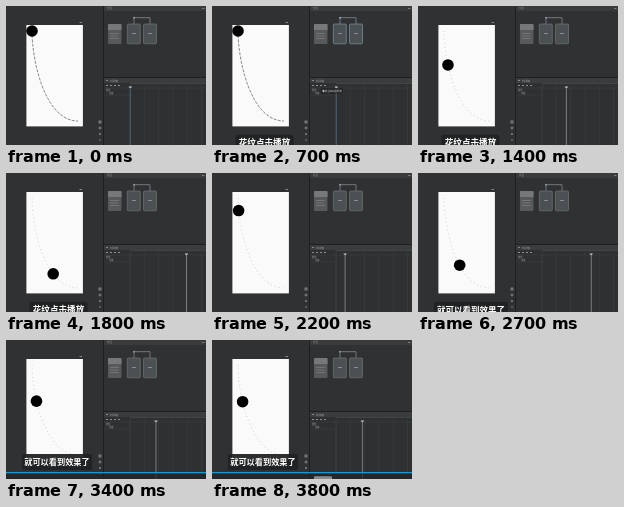
These frames come from a looping animation (200 px wide and 139 px high, 3900 ms). An HTML page:

```html
<!DOCTYPE html>
<html>
<head>
<meta charset="utf-8">
<title>Motion path editor</title>
<style>
  html, body { margin: 0; width: 100%; height: 100%; overflow: hidden; background: #303133; }
  svg { display: block; width: 100vw; height: 100vh; }
  text { font-family: "Noto Sans CJK SC", "Noto Sans CJK", "Noto Sans", sans-serif; font-size: 2.6px; fill: #a2a4a6; }
  #captionText { font-weight: 700; fill: #fff; text-anchor: middle; }
</style>
</head>
<body>
<svg viewBox="0 0 200 139" preserveAspectRatio="none">
  <rect width="200" height="139" fill="#303133"/>

  <!-- Artboard -->
  <rect x="20.4" y="19" width="56.5" height="101.4" fill="#fafafa"/>
  <rect x="73.5" y="16" width="2.5" height="1" fill="#85878a"/>
  <path id="track" d="M26 25C26 55 39 115 72 115" fill="none" stroke-width=".65"/>
  <circle id="ball" r="5.8" fill="#000"/>

  <!-- Tool strip -->
  <g fill="none" stroke="#a0a2a4" stroke-width=".7">
    <rect x="93" y="115" width="2" height="2"/>
    <circle cx="94" cy="122" r="1"/>
    <path d="M93 128h2m-1-1v2M93 134h2"/>
  </g>

  <!-- Interaction panel -->
  <rect x="98" width="102" height="71" fill="#2f3133"/>
  <rect x="98" width="102" height="5" fill="#393b3d"/>
  <text x="101" y="3.4">交互</text>
  <path d="M196 2.5h2.5" stroke="#999" stroke-width=".7"/>
  <rect x="102" y="18" width="13.5" height="20" rx="1" fill="#57595b"/>
  <path d="M102 24v-5q0-1 1-1h11.5q1 0 1 1v5z" fill="#76787a"/>
  <path d="M104 27.5h9M104 30h8M104 32.5h9" stroke="#85878a" stroke-width=".6"/>
  <path d="M128 18V11.7H144V18" fill="none" stroke="#8e979c" stroke-width=".7"/>
  <circle id="linkDot" cx="128" cy="11.7" r="1"/>
  <g id="states" fill="#4b5053" stroke-width=".6">
    <rect x="121.3" y="18" width="13" height="19.8" rx="1"/>
    <rect x="137.5" y="18" width="13" height="19.8" rx="1"/>
  </g>
  <path d="M126 27.5h4M142 27.5h4" stroke="#a4a8aa" stroke-width=".7"/>

  <!-- Timeline panel -->
  <rect x="98" y="72" width="102" height="67" fill="#2e3032"/>
  <rect x="98" y="72" width="102" height="5" fill="#3a3c3e"/>
  <path d="M97.5 0V139M98 71.5H200" stroke="#1e1f21"/>
  <text x="104" y="75.6">时间轴</text>
  <path d="M100 74.5h2" stroke="#aaa" stroke-width=".7"/>
  <path d="M98 82H200M98 89H124" stroke="#3c4042" stroke-width=".6"/>
  <path d="M124 77.5H200" stroke="#46524c" stroke-width=".7"/>
  <path d="M100 79.5h2m2 0h2m2 0h2m2 0h2" stroke="#a9abad" stroke-width=".8"/>
  <text x="100" y="85" style="font-size:2.3px">圆形</text>
  <text x="103" y="88.4" style="font-size:2.2px">位移</text>
  <g id="grid"></g>
  <g id="playhead">
    <path id="needle" d="M0 81V139" stroke-width=".9"/>
    <path d="M-1.5 80.5h3v.7L0 82l-1.5-.8z" fill="#c9cdcc"/>
  </g>
  <g id="tooltip">
    <rect x="109" y="82.5" width="21.5" height="5" rx=".7" fill="#1e1f20"/>
    <text x="110" y="86" style="font-size:2.5px;fill:#eee">播放当前动画预览</text>
  </g>

  <!-- Player overlay -->
  <g id="player">
    <rect y="133" width="200" height="6" fill="#202224" opacity=".65"/>
    <rect y="132" width="200" height="1.3" fill="#1599d6"/>
    <rect id="pill" x="102" y="136.2" width="18" height="4" rx="1" fill="#8b8d8f"/>
  </g>
  <g id="caption">
    <rect id="captionBox" rx="2" height="16" fill="#202122" opacity=".94"/>
    <text id="captionText"></text>
  </g>
</svg>
<script>
const LOOP = 3900, STEP = 100, RUN = 960;
const START_X = 124, TRAVEL = 77;
const runStarts = [1100, 2090, 3080, 3475];
const captions = [
  { from: 300, to: 1900, text: "花纹点击播放", x: 52.5, top: 128.7, width: 58, size: 8.6 },
  { from: 2400, to: 2900, text: "就可以看到效果了", x: 53, top: 128.7, width: 74, size: 8.5 },
  { from: 2900, to: LOOP, text: "就可以看到效果了", x: 51, top: 114, width: 70, size: 8.2 }
];

const el = id => document.getElementById(id);
const set = (id, attrs) => {
  for (const [name, value] of Object.entries(attrs)) el(id).setAttribute(name, value);
};
const show = (id, visible) => { el(id).style.display = visible ? "" : "none"; };

const track = el("track");
const trackLength = track.getTotalLength();

el("grid").innerHTML = Array.from({ length: 6 }, (_, i) => {
  const x = START_X + i * 14.3;
  return `<path d="M${x} 79V139" stroke="${i ? "#3d4143" : "#48504b"}" stroke-width=".6"/>`;
}).join("");

function drawCaption(time) {
  const line = captions.find(c => time >= c.from && time < c.to);
  show("caption", line);
  if (!line) return;
  set("captionBox", { x: line.x - line.width / 2, y: line.top, width: line.width });
  set("captionText", { x: line.x, y: line.top + 11.1 });
  el("captionText").style.fontSize = line.size + "px";
  el("captionText").textContent = line.text;
}

function draw(now) {
  const time = Math.floor(now % LOOP / STEP) * STEP;
  const start = runStarts.filter(s => s <= time).pop();
  const playing = start !== undefined;
  const progress = playing ? Math.min(1, (time - start) / RUN) : 0;
  const point = track.getPointAtLength(progress * trackLength);

  set("ball", { cx: point.x, cy: point.y });
  set("playhead", { transform: `translate(${START_X + .3 + TRAVEL * progress} 0)` });
  set("needle", { stroke: playing ? "#858a8a" : "#4f6475" });
  set("track", playing
    ? { stroke: "#b3b6c0", "stroke-dasharray": "1 3" }
    : { stroke: "#4b4c5b", "stroke-dasharray": "3 1.3" });

  const hovering = time >= 500 && time < 800;
  show("tooltip", hovering);
  set("linkDot", { fill: hovering ? "#7ba9bd" : "#8e979c" });
  set("states", { stroke: hovering ? "#87a3b0" : "#777d80" });
  show("player", time >= 2900);
  show("pill", time >= 3500);
  drawCaption(time);
}

function tick() {
  draw(performance.now());
  requestAnimationFrame(tick);
}
tick();
</script>
</body>
</html>
```
